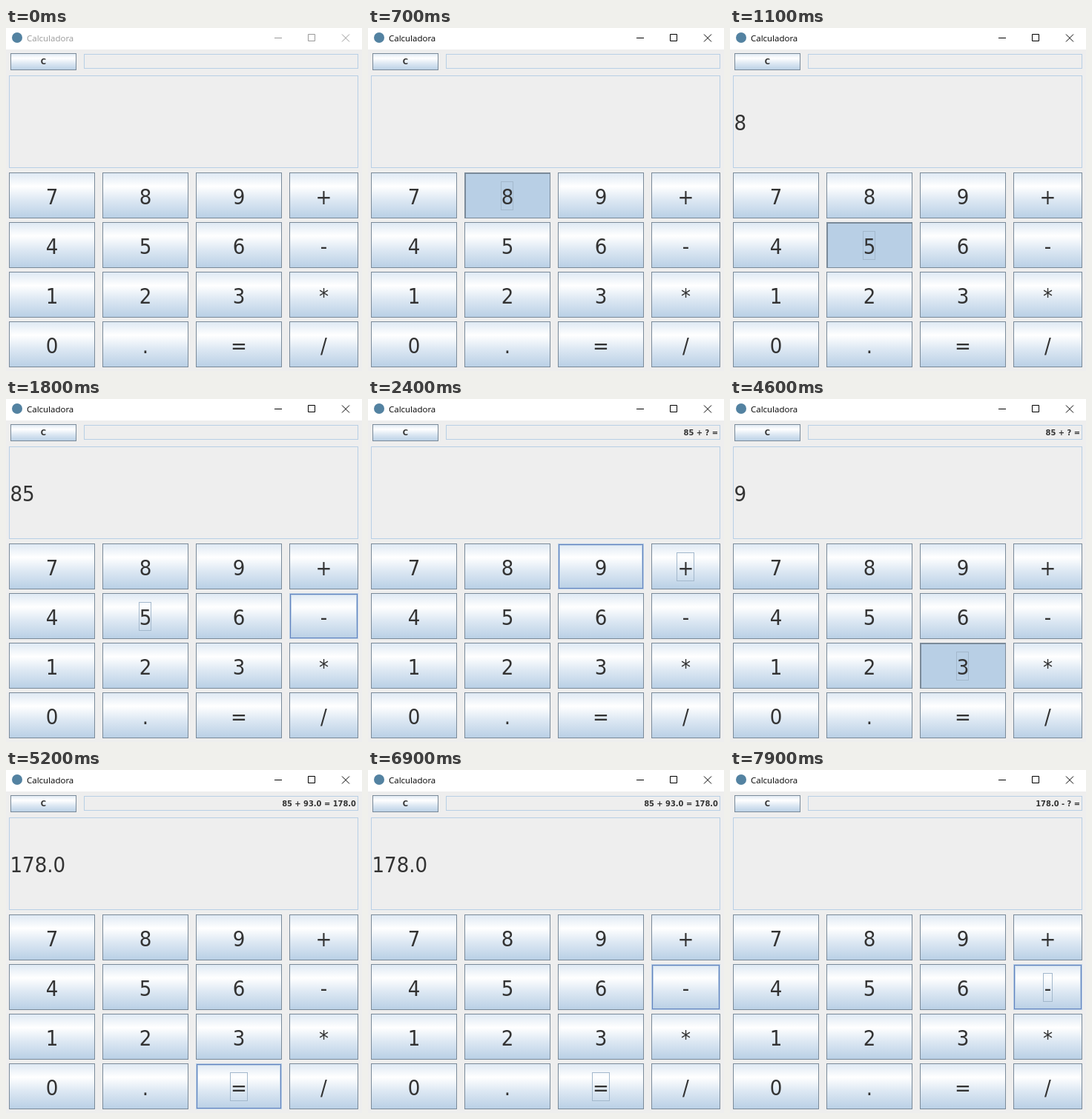
Write an HTML page that moves like this. It is 480 px wide and 463 px high and loops after 8000 ms.

```html
<!DOCTYPE html>
<html lang="es">
<head>
<meta charset="utf-8">
<title>Calculadora</title>
<style>
html, body { margin: 0; width: 100%; height: 100%; overflow: hidden; background: #eee; }
svg { display: block; width: 480px; height: 463px; }
rect, .frame { shape-rendering: crispEdges; }
text { font: 29px "DejaVu Sans Condensed", "DejaVu Sans", sans-serif; font-stretch: condensed; fill: #333; }
.small { font-size: 11px; font-weight: bold; }
.title { font: 11.5px "Open Sans", "Noto Sans", sans-serif; }
.mid { text-anchor: middle; }
.end { text-anchor: end; }
</style>
</head>
<body>
<svg id="stage" viewBox="0 0 480 463">
  <defs>
    <linearGradient id="face" x1="0" y1="0" x2="0" y2="1">
      <stop offset="0" stop-color="#dde8f3"/>
      <stop offset=".3" stop-color="#fff"/>
      <stop offset=".6" stop-color="#dde8f3"/>
      <stop offset="1" stop-color="#b8cfe5"/>
    </linearGradient>
  </defs>
  <rect width="480" height="463" fill="#eee"/>
  <rect width="480" height="29" fill="#fff"/>
  <circle cx="15" cy="13" r="7" fill="#5382a1"/>
  <text id="title" class="title" x="28" y="18">Calculadora</text>
  <path id="controls" fill="none" d="M362 13.5h10M407.5 8.5h9v9h-9zM453 8.5l10 10M463 8.5l-10 10"/>
</svg>
<script>
const stage = document.getElementById('stage');
const title = document.getElementById('title');
const controls = document.getElementById('controls');

function add(tag, attrs, parent = stage) {
  const node = document.createElementNS('http://www.w3.org/2000/svg', tag);
  for (const name in attrs) node.setAttribute(name, attrs[name]);
  return parent.appendChild(node);
}

const show = (node, on) => node.setAttribute('visibility', on ? 'visible' : 'hidden');

// One-pixel outline, inset from the given box.
function outline(x, y, w, h, inset, stroke, parent) {
  return add('rect', {
    x: x + inset + .5, y: y + inset + .5,
    width: w - 2 * inset - 1, height: h - 2 * inset - 1,
    fill: 'none', stroke
  }, parent);
}

function label(text, x, y, cls, parent) {
  const node = add('text', { x, y, class: cls }, parent);
  node.textContent = text;
  return node;
}

function face(x, y, width, height) {
  add('rect', { x, y, width, height, fill: 'url(#face)' });
  outline(x, y, width, height, 0, '#7a8a99');
}

function makeKey(key, x, y, w, h) {
  face(x, y, w, h);

  const hover = add('g', {});
  ['#b8cfe5', '#6382bf', '#b8cfe5'].forEach((color, i) => outline(x, y, w, h, i, color, hover));

  const press = add('g', {});
  add('rect', { x, y, width: w, height: h, fill: '#7a8a99' }, press);
  add('rect', { x: x + 2, y: y + 2, width: w - 3, height: h - 3, fill: '#b8cfe5' }, press);

  const middle = x + w / 2;
  const focusWidth = { '+': 24, '=': 24, '-': 13 }[key] || 17;
  const focus = outline(Math.floor(middle - focusWidth / 2), y + 12, focusWidth, 39, 0, '#a3b8cc');
  label(key, middle, y + 43, 'mid');
  return { hover, press, focus };
}

face(6, 34, 89, 23);
label('C', 50.5, 49, 'small mid');
outline(105, 35, 370, 20, 0, '#b8cfe5');
outline(4, 64, 471, 125, 0, '#b8cfe5');
const formula = label('', 472, 49, 'small end');
const display = label('', 5.5, 138, '');

const keys = {};
['789+', '456-', '123*', '0.=/'].forEach((row, r) => [...row].forEach((key, c) => {
  keys[key] = makeKey(key, 4 + 126 * c, 195 + 67 * r, c < 3 ? 116 : 93, 62);
}));

// Each step: time, pointer position, button held, new texts.
const steps = [
  [0, '', false, { display: '', formula: '' }],
  [200, '8'],
  [700, '8', true],
  [800, '8', false, { display: '8' }],
  [900, '5'],
  [1100, '5', true],
  [1200, '5', false, { display: '85' }],
  [1300, '-'],
  [1700, '*'],
  [1800, '-'],
  [1900, '+'],
  [2100, '+', true],
  [2200, '+', false, { display: '', formula: '85 + ? =' }],
  [2400, '9'],
  [4100, '9', true],
  [4200, '9', false, { display: '9' }],
  [4300, '3'],
  [4600, '3', true],
  [4700, '3', false, { display: '93' }],
  [4800, '='],
  [5100, '=', true],
  [5200, '=', false, { display: '178.0', formula: '85 + 93.0 = 178.0' }],
  [6200, ''],
  [6400, '3'],
  [6800, '6'],
  [6900, '-'],
  [7800, '-', true],
  [7900, '-', false, { display: '', formula: '178.0 - ? =' }]
];

function stateAt(time) {
  const state = { focus: '' };
  for (const [start, pointer, held = false, texts] of steps) {
    if (start > time) break;
    Object.assign(state, { pointer, held }, texts);
    if (held) state.focus = pointer;
  }
  return state;
}

function render() {
  const state = stateAt(performance.now() % 8000);
  const ink = state.focus ? '#000' : '#999';
  title.style.fill = ink;
  controls.setAttribute('stroke', ink);
  display.textContent = state.display;
  formula.textContent = state.formula;
  for (const key in keys) {
    const over = key === state.pointer;
    show(keys[key].hover, over && !state.held);
    show(keys[key].press, over && state.held);
    show(keys[key].focus, key === state.focus);
  }
  requestAnimationFrame(render);
}
render();
</script>
</body>
</html>
```
